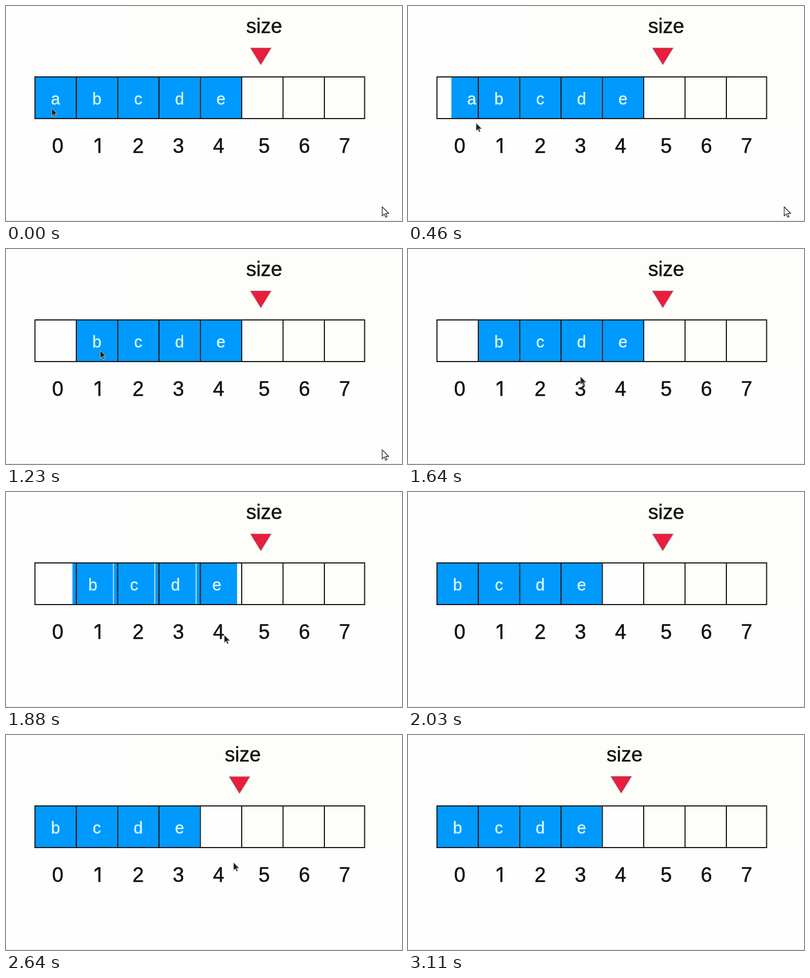
An HTML page that plays this animation: 704 by 382 pixels, repeating every 3.27 s.

```html
<!DOCTYPE html>
<html lang="en">
<head>
<meta charset="utf-8">
<title>Array removal</title>
<style>
  html, body { margin: 0; width: 100%; height: 100%; overflow: hidden; background: #fefefe; }
  svg { display: block; width: 704px; height: 382px; }
  text {
    font-family: "Liberation Sans", Arial, sans-serif; font-size: 36px; text-anchor: middle;
    fill: #111; stroke: #111; stroke-width: .5;
  }
  .item text { font-size: 29px; fill: #dcf8ff; stroke: #dcf8ff; stroke-width: .4; }
  .item rect { fill: #0099fd; }
  .one { font-family: Inter, Roboto, sans-serif; }
</style>
</head>
<body>
<svg viewBox="0 0 704 382">
  <defs>
    <path id="arrow" d="M0 0V14L3.2 11 5.4 16 7.6 15 5.4 10.2H10Z"/>
  </defs>
  <rect x="211" width="493" height="208" fill="#fdfef9"/>
  <rect y="381" width="704" height="1" fill="#e6e6e6"/>
  <rect x="346" y="126" width="73" height="74" fill="#fefefe"/>
  <g id="items"></g>
  <path id="grid" fill="none" stroke="#1c1c1c" stroke-width="2"/>
  <g id="digits"></g>
  <g id="size">
    <text x="459" y="48">size</text>
    <path d="M434.5 74.5H471.5L453 104.5Z" fill="#ea1d3c" stroke="#98868c"/>
  </g>
  <use id="pointer" href="#arrow" fill="#1c1c1c" stroke="#b8bcc0"/>
  <use id="mouse" href="#arrow" transform="translate(668.8 356.8) scale(1.15)" fill="#fff" stroke="#111" stroke-width=".95"/>
</svg>
<script>
const LOOP = 3270, STEP = 78.2, LEFT = 51.5, CELL = 73.5;
// Start times of the three slides, and their length
const REMOVE = 372, SHIFT = 1820, SHRINK = 2539, SLIDE = 200;
const $ = id => document.getElementById(id);

function add(parent, tag, attrs, text = "") {
  const el = document.createElementNS("http://www.w3.org/2000/svg", tag);
  for (const k in attrs) el.setAttribute(k, attrs[k]);
  el.textContent = text;
  return parent.appendChild(el);
}

const items = [..."abcde"].map((letter, i) => {
  const g = add($("items"), "g", { class: "item" });
  add(g, "rect", { x: LEFT + 0.3 + i * CELL, y: 126, width: 72.2, height: 74 });
  add(g, "text", { x: 88 + i * CELL, y: 174.5 }, letter);
  return g;
});

let lines = "M51.5 126H637.5V200H51.5Z";
for (let i = 0; i < 8; i++) {
  if (i) lines += `M${LEFT + i * CELL} 126V200`;
  const x = 92 + i * 71.5 + (i > 4 ? 9.5 : 0);
  add($("digits"), "text", { x, y: 261, class: i === 1 ? "one" : "" }, i);
}
$("grid").setAttribute("d", lines);

// Pointer stops: time, x, y
const stops = [
  [0, 81, 181.5], [460, 121, 208], [1230, 167, 180],
  [1880, 388, 254], [2640, 404.5, 226.5]
];

function pointerAt(t) {
  const i = stops.findIndex(s => s[0] > t);
  if (i < 0) return stops.at(-1).slice(1);
  const [t0, x0, y0] = stops[i - 1], [t1, x1, y1] = stops[i];
  const u = (t - t0) / (t1 - t0);
  return [x0 + (x1 - x0) * u, y0 + (y1 - y0) * u];
}

function slide(t, start) {
  const u = Math.min(1, Math.max(0, (t - start) / SLIDE));
  return u * u * (3 - 2 * u);
}

const move = (el, x, y = 0) => el.setAttribute("transform", `translate(${x} ${y})`);
const show = (el, on) => el.setAttribute("visibility", on ? "visible" : "hidden");

function draw(now) {
  const t = now % LOOP;
  const held = 60 + STEP * Math.floor((t - 55) / STEP);
  const removed = slide(held, REMOVE), shrunk = slide(held, SHRINK);
  const shifted = slide(held, SHIFT) * CELL;

  items.forEach((el, i) => move(el, i ? -shifted : removed * CELL));
  show(items[0], removed < 1);
  move($("size"), -74 * shrunk, -shrunk);

  // The pointer hides for a while after each slide
  const hidden = [REMOVE, SHIFT, SHRINK].some(s => t > s + 190 && t < s + 740);
  move($("pointer"), ...pointerAt(t));
  show($("pointer"), !hidden);
  show($("mouse"), t < 1560);
}

const start = performance.now();
function tick() {
  draw(performance.now() - start);
  requestAnimationFrame(tick);
}
tick();
</script>
</body>
</html>
```
